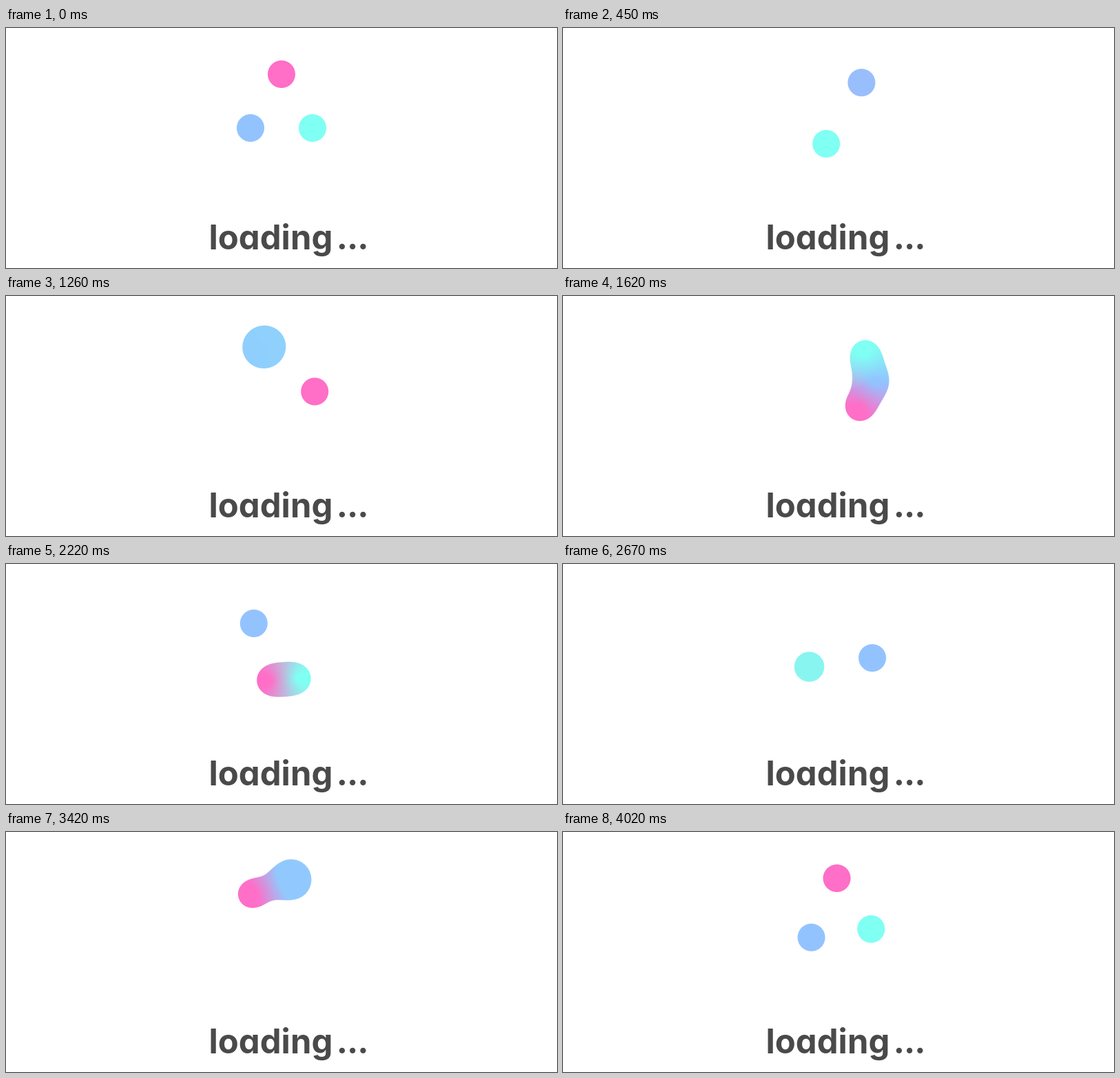
An HTML page with a canvas for the animation above (4.05 s loop, 800x348 px).

```html
<!DOCTYPE html>
<html lang="en">
<head>
<meta charset="utf-8">
<title>Loading</title>
<style>
  html, body { margin: 0; width: 100%; height: 100%; overflow: hidden; background: #fff; }
  canvas { position: absolute; left: 300px; top: 19px; }
  svg { position: absolute; left: 0; top: 0; }
  text {
    font: 700 49px Inter, "Open Sans", sans-serif;
    font-feature-settings: "cv11";
    fill: #4a4a4a;
  }
  .dots { letter-spacing: -1.2px; }
</style>
</head>
<body>
<canvas id="stage" width="200" height="200"></canvas>
<svg width="800" height="348"><text x="294.5" y="321">loading<tspan class="dots" x="479.8">...</tspan></text></svg>
<script>
const LOOP = 4050, STEP = 30, SIZE = 200, CENTER = 100;
const ORBIT = 52, RADIUS = 20, BLEND = 46, TINT = 36;

// Listed from the bottom layer to the top; turns are whole orbits per loop.
const balls = [
  { start: -90, turns: 1, rgb: [255, 110, 199] },
  { start: 30, turns: 2, rgb: [128, 255, 243] },
  { start: 150, turns: 4, rgb: [147, 195, 255] }
];
const pairs = [[0, 1, 2], [0, 2, 1], [1, 2, 0]];

const ctx = document.getElementById('stage').getContext('2d');
const image = ctx.createImageData(SIZE, SIZE);

const clamp = v => Math.max(0, Math.min(1, v));
const mix = (a, b, t) => a + (b - a) * t;
const smooth = (lo, hi, v) => {
  const t = clamp((v - lo) / (hi - lo));
  return t * t * (3 - 2 * t);
};
const gap = (a, b) => Math.hypot(a.x - b.x, a.y - b.y);

// Smooth union of two distances; strength scales the swelling.
function join(a, b, strength) {
  const h = Math.max(0, 1 - Math.abs(a - b) / BLEND);
  return Math.min(a, b) - h * h * BLEND / 4 * strength;
}
const share = (a, b) => clamp(.5 + (a - b) / (2 * TINT));

function draw(time) {
  for (const ball of balls) {
    const angle = (ball.start + 360 * ball.turns * time / LOOP) * Math.PI / 180;
    ball.x = CENTER + ORBIT * Math.cos(angle);
    ball.y = CENTER + ORBIT * Math.sin(angle);
  }

  // The closest two merge first, then the third joins them.
  const span = ([i, j]) => gap(balls[i], balls[j]);
  const closest = pairs.reduce((p, q) => span(q) < span(p) ? q : p);
  const [low, top, third] = closest.map(i => balls[i]);
  const apart = span(closest);
  const swell = smooth(0, 10, apart);
  const fade = smooth(0, 36, apart);

  const data = image.data;
  for (let y = 0, p = 0; y < SIZE; y++) {
    for (let x = 0; x < SIZE; x++, p += 4) {
      const point = { x: x + .5, y: y + .5 };
      const b = gap(point, top) - RADIUS;
      // The upper ball takes over the lower one as they meet.
      const a = mix(b, gap(point, low) - RADIUS, fade);
      const c = gap(point, third) - RADIUS;
      const pair = join(a, b, swell);
      const alpha = clamp(.5 - join(pair, c, 1));
      data[p + 3] = 255 * alpha;
      if (!alpha) continue;
      const topShare = mix(.94, share(a, b), fade);
      const thirdShare = share(pair, c);
      for (let n = 0; n < 3; n++) {
        data[p + n] = mix(mix(low.rgb[n], top.rgb[n], topShare), third.rgb[n], thirdShare);
      }
    }
  }
  ctx.putImageData(image, 0, 0);
}

let origin, shown = -1;
function tick(now) {
  origin ??= now;
  const time = Math.floor((now - origin) % LOOP / STEP) * STEP;
  if (time !== shown) draw(shown = time);
  requestAnimationFrame(tick);
}
draw(0);
requestAnimationFrame(tick);
</script>
</body>
</html>
```
